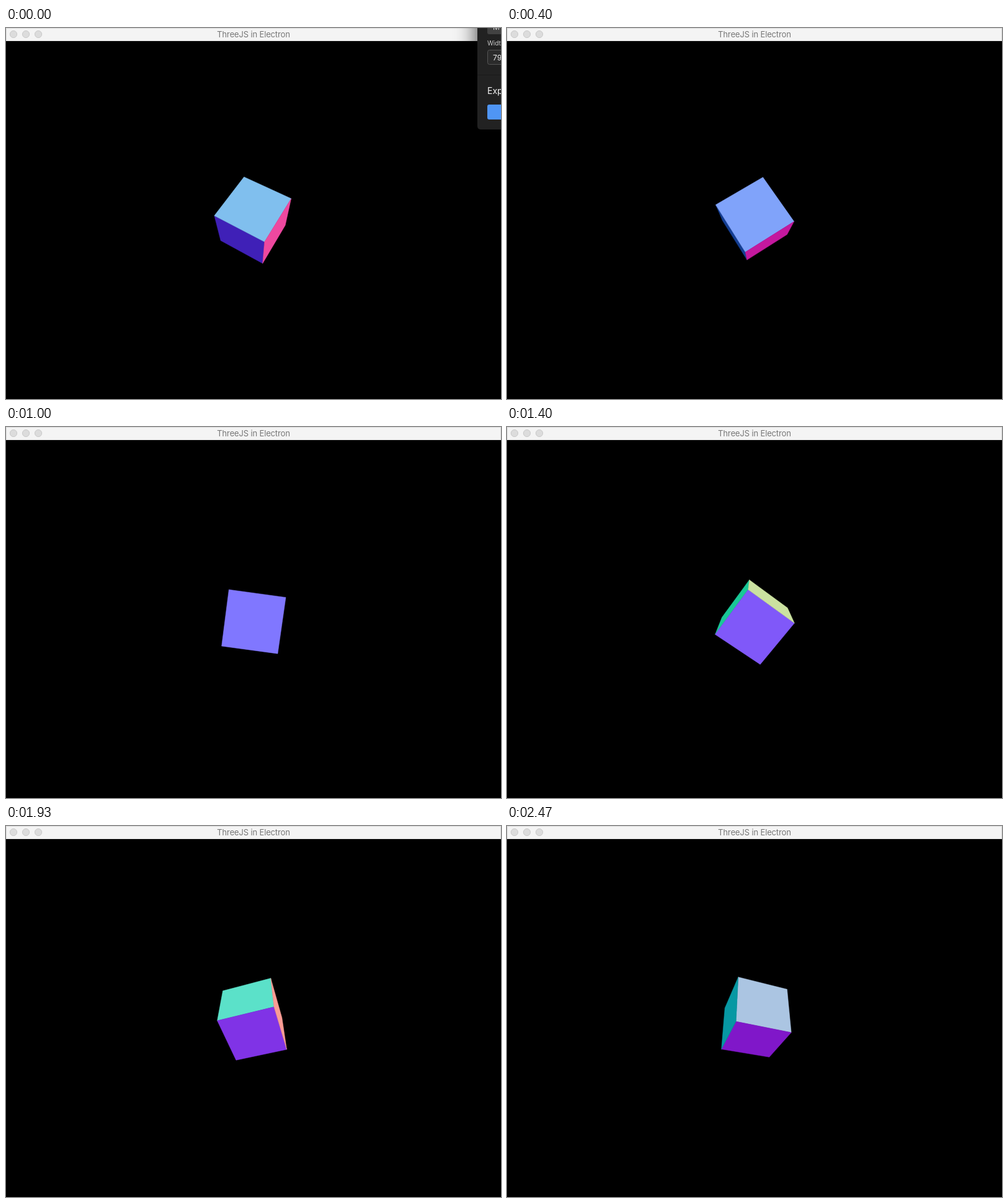
Animation, 796 px wide and 596 px high, one loop 2.54 s. Source, as an HTML page:

```html
<!DOCTYPE html>
<html lang="en">
<head>
<meta charset="utf-8">
<title>Spinning cube</title>
<style>
  html, body { margin: 0; width: 100%; height: 100%; overflow: hidden; background: #000; }
  svg { display: block; position: absolute; left: 0; top: 0; }
  text { font-family: Inter, sans-serif; }
  .panel {
    position: absolute; left: 758px; top: -60px; width: 120px; height: 223px;
    background: #222; border-radius: 5px; box-shadow: 0 8px 34px rgba(0, 0, 0, .75);
    animation: hide 2540ms step-end infinite;
  }
  .panel svg { top: 60px; }
  .stage { position: absolute; left: 0; top: 0; width: 796px; height: 596px; overflow: hidden; }
  @keyframes hide {
    0% { visibility: visible; }
    2.7%, 100% { visibility: hidden; }
  }
</style>
</head>
<body>
<div class="stage">
  <svg width="796" height="596" viewBox="0 0 796 596">
    <rect width="796" height="596"/>
    <rect width="796" height="21" fill="#dadada"/>
    <rect x="1" y="1" width="794" height="19.5" fill="#f4f4f4"/>
    <g fill="#dcdcdc" stroke="#cacaca">
      <circle cx="12" cy="10" r="5.6"/>
      <circle cx="32" cy="10" r="5.6"/>
      <circle cx="52" cy="10" r="5.6"/>
    </g>
    <text x="398" y="15" font-size="13" letter-spacing="-.15" text-anchor="middle" fill="#777">ThreeJS in Electron</text>
    <g id="cube" stroke-width=".5" stroke-linejoin="round"></g>
  </svg>
  <div class="panel">
    <svg width="120" height="163" viewBox="0 0 120 163">
      <rect x="16" y="-14" width="90" height="24" rx="3" fill="#424242"/>
      <text x="25" y="3" font-size="12" fill="#ddd">M</text>
      <text x="16" y="28" font-size="10" fill="#ccc">Width</text>
      <rect x="16.5" y="35.5" width="60" height="23" rx="3" fill="#2b2b2b" stroke="#555"/>
      <text x="25" y="52" font-size="12" fill="#eee">796</text>
      <path d="M0 75.5H120" stroke="#1a1a1a"/>
      <text x="16" y="106" font-size="14" fill="#f2f2f2">Export</text>
      <rect x="16" y="123" width="90" height="24" rx="3" fill="#4f95f5"/>
    </svg>
  </div>
</div>
<script>
const LOOP = 2540, STEP = 1000 / 15, LAST = 37;
const CX = 398, CY = 310, DIST = 5;
const FOCAL = 289 / Math.tan(35 * Math.PI / 180);

const TICKS = [[0, 419], [6, 443], [9, 455.7], [15, 478], [21, 503], [29, 535.4], [37, 567]];

const cube = document.getElementById('cube');
const faces = Array.from({ length: 6 }, () =>
  cube.appendChild(document.createElementNS('http://www.w3.org/2000/svg', 'polygon')));

function ticksAt(step) {
  const k = Math.max(1, TICKS.findIndex(p => p[0] >= step));
  const [a, u] = TICKS[k - 1], [b, v] = TICKS[k];
  return u + (v - u) * (step - a) / (b - a);
}

// cube axes after turning about y, then about x
function axesAt(rx, ry) {
  const c = Math.cos(rx), s = Math.sin(rx), d = Math.cos(ry), t = Math.sin(ry);
  return [[d, s * t, -c * t], [0, c, s], [t, -s * d, c * d]];
}

function project([x, y, z]) {
  const k = FOCAL / (DIST - z);
  return (CX + x * k).toFixed(2) + ',' + (CY - y * k).toFixed(2);
}

function draw(step) {
  const angle = ticksAt(step) * .01;
  const axes = axesAt(angle, angle * 2);
  faces.forEach((face, i) => {
    const normal = axes[i >> 1].map(v => i & 1 ? -v : v);
    const u = axes[((i >> 1) + 1) % 3], w = axes[((i >> 1) + 2) % 3];
    const visible = normal[2] * DIST > .5;
    face.setAttribute('display', visible ? 'inline' : 'none');
    if (!visible) return;
    const corners = [[1, 1], [1, -1], [-1, -1], [-1, 1]].map(([p, q]) =>
      project(normal.map((n, j) => (n + p * u[j] + q * w[j]) / 2)));
    const color = `rgb(${normal.map(n => Math.round((n + 1) * 127.5))})`;
    face.setAttribute('points', corners.join(' '));
    face.setAttribute('fill', color);
    face.setAttribute('stroke', color);
  });
}

function tick() {
  const t = performance.now() % LOOP;
  draw(Math.min(LAST, Math.floor((t + 3.4) / STEP)));
  requestAnimationFrame(tick);
}
tick();
</script>
</body>
</html>
```
